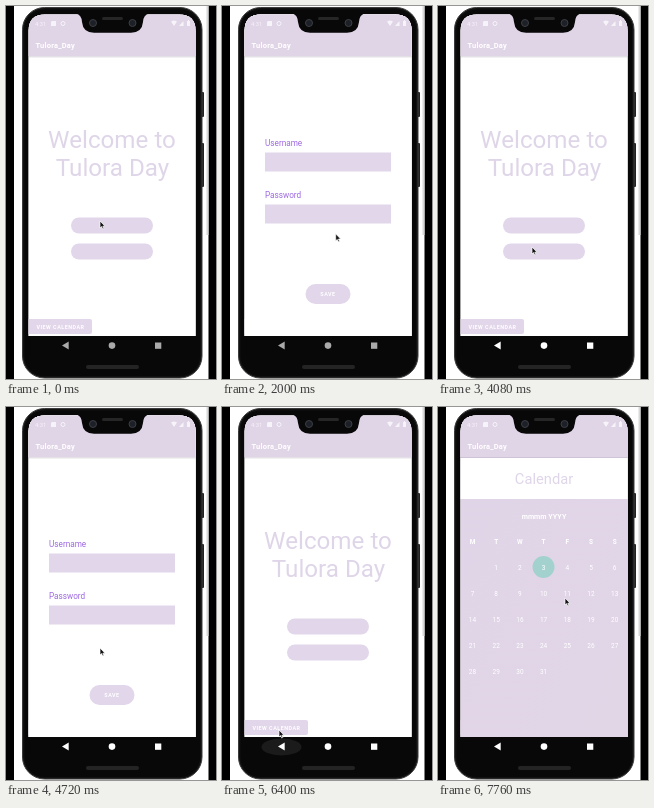
These frames come from a looping animation (210 px wide and 373 px high, 8000 ms). An HTML page:

```html
<!DOCTYPE html>
<html lang="en">
<head>
<meta charset="utf-8">
<style>
html, body { margin: 0; width: 100%; height: 100%; overflow: hidden; background: #fff; }
svg { display: block; width: 100vw; height: 100vh; font-family: Roboto, sans-serif; }
.lilac { fill: #e2d6ea; }
.bar { fill: #e0d4e7; }
.white { fill: #fff; }
.big { font-size: 24.2px; fill: #dfd5e8; text-anchor: middle; }
.label { font-size: 8.2px; fill: #9d68e2; }
.cap { font-size: 5.4px; font-weight: 700; fill: #fff; text-anchor: middle; letter-spacing: .5px; }
.mid { text-anchor: middle; }
</style>
</head>
<body>
<svg viewBox="0 0 210 373" preserveAspectRatio="none">
  <defs>
    <clipPath id="view"><path d="M22.600 330V25Q22.600 8.600 39 8.600H173Q189.600 8.600 189.600 25V330Z"/></clipPath>
    <linearGradient id="shade" x2="0" y2="1">
      <stop stop-color="#aaa0b0" stop-opacity=".4"/><stop offset="1" stop-color="#aaa0b0" stop-opacity="0"/>
    </linearGradient>
    <linearGradient id="tint" x2="1" y2="1">
      <stop stop-color="#e0d4e8"/><stop offset="1" stop-color="#e1d6e6"/>
    </linearGradient>
    <g id="top">
      <rect class="bar" x="22" y="0" width="168" height="50"/>
      <rect x="22" y="50" width="168" height="2.5" fill="url(#shade)"/>
      <text class="white" x="29.500" y="42" font-size="7.500" font-weight="700" letter-spacing=".2">Tulora_Day</text>
    </g>
  </defs>

  <rect width="8" height="373"/>
  <rect x="202.500" width="8" height="373"/>
  <rect x="200.500" width="2" height="229" fill="#d8d8d8"/>
  <rect x="195" y="86" width="3" height="25" rx="1" fill="#222"/>
  <rect x="195" y="137" width="3" height="44" rx="1" fill="#222"/>
  <rect x="16.500" y="1.500" width="179.500" height="370.500" rx="22" fill="#111" stroke="#3c3c3c"/>
  <rect x="18.500" y="3.500" width="175.500" height="366.500" rx="20" fill="#080808"/>
  <rect x="80" y="359" width="53" height="4" rx="2" fill="#242424"/>

  <g clip-path="url(#view)">
    <rect class="white" x="22" y="8" width="168" height="323"/>
    <g id="welcome">
      <rect class="white" x="22" y="0" width="168" height="345"/>
      <use href="#top"/>
      <text class="big" x="106" y="141.500">Welcome to</text>
      <text class="big" x="106.500" y="170">Tulora Day</text>
      <rect id="press" x="65" y="213" width="82" height="16" rx="8" fill="#c9bfd0"/>
      <rect class="lilac" x="65" y="211.500" width="82" height="16" rx="8"/>
      <rect class="lilac" x="65" y="237.500" width="82" height="16" rx="8"/>
      <rect class="lilac" x="21" y="313" width="65" height="15" rx="2"/>
      <text class="cap" x="54.500" y="322.500">VIEW CALENDAR</text>
    </g>
    <g id="login">
      <rect class="white" x="22" y="0" width="168" height="345"/>
      <use href="#top"/>
      <text class="label" x="43" y="140">Username</text>
      <rect class="lilac" x="43" y="146.500" width="126" height="19"/>
      <text class="label" x="43" y="192">Password</text>
      <rect class="lilac" x="43" y="198.500" width="126" height="19"/>
      <rect class="lilac" x="83.500" y="278" width="45" height="20" rx="10"/>
      <text class="cap" x="106" y="290">SAVE</text>
    </g>
    <g id="calendar">
      <rect x="22" y="0" width="168" height="345" fill="url(#tint)"/>
      <use href="#top"/>
      <rect class="white" x="22" y="51" width="168" height="41"/>
      <text class="mid" x="106" y="77" font-size="14.7" fill="#dfd5e8">Calendar</text>
      <text class="white mid" x="106" y="111.500" font-size="7.2" font-weight="700">mmmm YYYY</text>
      <circle cx="105.500" cy="160" r="11" fill="#a3d2ce"/>
      <g id="days" class="white mid" font-size="6.5"></g>
    </g>
    <g class="white" opacity=".75">
      <text x="29" y="20" font-size="5.8">4:31</text>
      <path d="M46 15H50V20H45V16Z"/>
      <circle cx="57" cy="17.500" r="2" fill="none" stroke="#fff"/>
      <path d="M165 15.500Q168 13.500 171 15.500L168 20ZM173 20L177.500 15V20ZM181 15H182V14H183V15H184V20H181Z"/>
    </g>
  </g>

  <path d="M70 7.500Q75.500 8.500 76 16Q77 26.700 88 26.700H125Q136 26.700 137 16Q137.500 8.500 143 7.500Z" fill="#080808"/>
  <g fill="#1d2026" stroke="#3b3e44">
    <circle cx="87" cy="17" r="3.500"/><circle cx="126.500" cy="17" r="3.500"/>
  </g>
  <rect x="96" y="11" width="21" height="3" rx="1.500" fill="#262626"/>

  <ellipse id="ripple" cx="59.500" cy="340" rx="20" ry="8.500" fill="#444"/>
  <g id="nav"><path d="M56 339.600L62.700 335.600V343.600Z"/><circle cx="106" cy="339.600" r="3.300"/><rect x="149" y="336.500" width="6.300" height="6.300"/></g>
  <path id="cursor" d="M0 0V7L1.600 5.600L2.700 8L3.900 7.400L2.800 5.200H5Z" fill="#111" stroke="#fff" stroke-width=".7"/>
</svg>
<script>
const $ = id => document.getElementById(id);
const LOOP = 8000, STEP = 80, FADE = 320;

// Calendar grid; the month starts on a Tuesday
const cell = (col, y, s, weight) =>
  `<text x="${34.5 + col * 23.7}" y="${y}" font-weight="${weight}">${s}</text>`;
let grid = [..."MTWTFSS"].map((d, i) => cell(i, 136.5, d, 700)).join("");
for (let d = 1; d <= 31; d++) grid += cell(d % 7, 163 + Math.floor(d / 7) * 26, d, 400);
$("days").innerHTML = grid;

// Pointer stops: time, x, y
const path = [
  [0, 94, 215], [480, 94, 215], [800, 115, 225], [1920, 115, 225],
  [2800, 58, 348], [2960, 58, 342], [3360, 58, 342], [3920, 90, 234],
  [4080, 94, 241], [4720, 94, 241], [5520, 69, 331], [5680, 59, 334],
  [6000, 59, 334], [6400, 57, 323], [7280, 57, 323], [7760, 127, 191], [LOOP, 127, 191]
];
const clamp = v => Math.max(0, Math.min(1, v));
const ease = v => v * v * (3 - 2 * v);
const ramp = (t, from, len = FADE) => ease(clamp((t - from) / len));

function pointer(t) {
  const i = path.findIndex(p => p[0] > t);
  const [t0, x0, y0] = path[i - 1], [t1, x1, y1] = path[i];
  const k = ease((t - t0) / (t1 - t0));
  return [x0 + (x1 - x0) * k, y0 + (y1 - y0) * k];
}

function show(id, k) {
  $(id).setAttribute("opacity", k);
  $(id).setAttribute("transform", `translate(0 ${14 * (1 - k)})`);
}

function draw(now) {
  const t = Math.floor(now % LOOP / STEP) * STEP;
  show("login", ramp(t, 1280) - ramp(t, 3120) + ramp(t, 4160) - ramp(t, 5760));
  show("calendar", ramp(t, 7040));
  $("press").setAttribute("opacity", t >= 1120 && t < 1360 ? 1 : 0);
  const pulse = (start, peak) => peak * ramp(t, start, 160) * (1 - ramp(t, start + 320, 560));
  $("ripple").setAttribute("opacity", pulse(3120, .7) + pulse(5760, .8));
  $("nav").setAttribute("fill", t < 3200 ? "#aaa" : "#fff");
  $("cursor").setAttribute("transform", `translate(${pointer(t)})`);
  requestAnimationFrame(draw);
}
draw(0);
</script>
</body>
</html>
```
